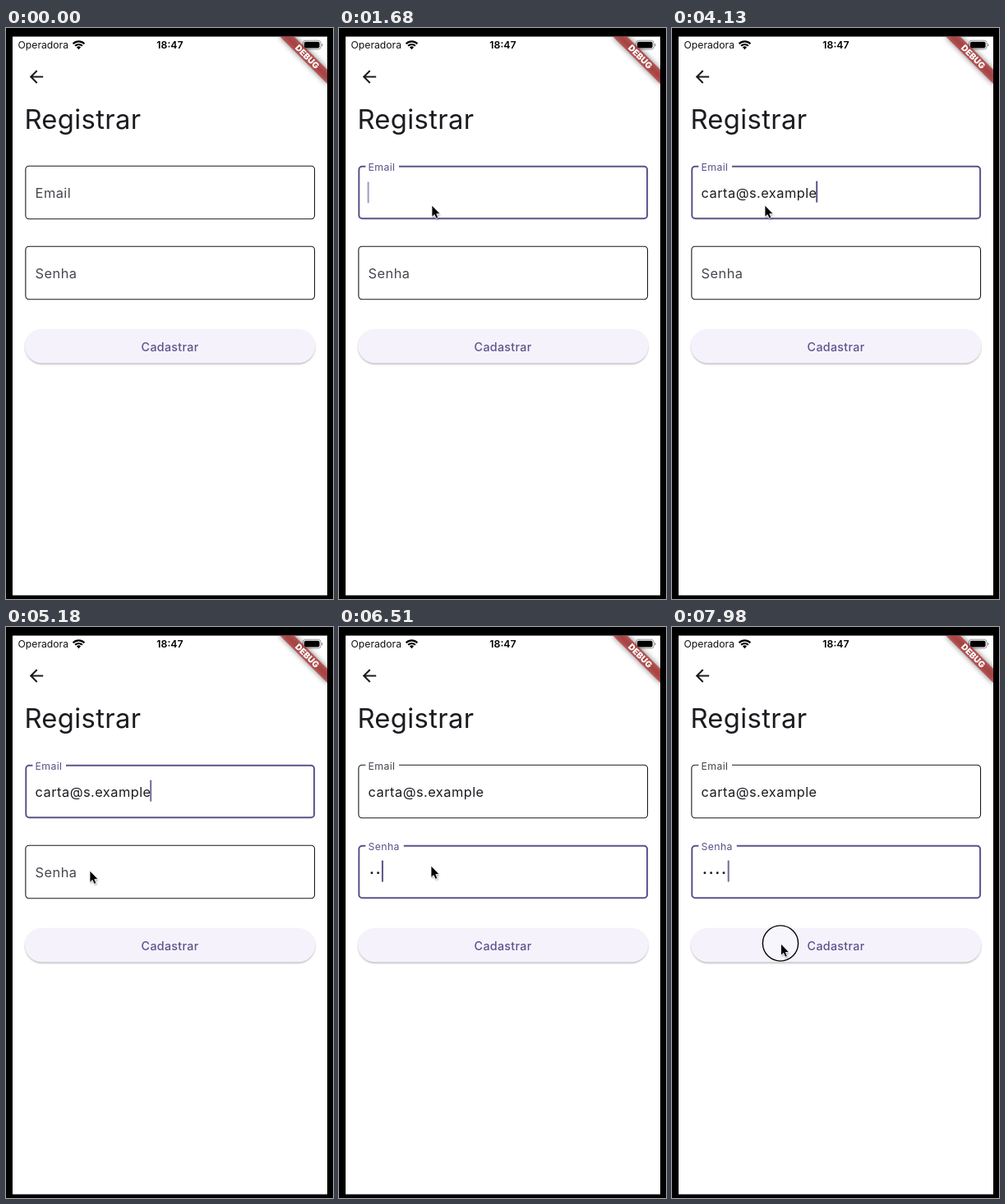
Write an HTML page that moves like this. It is 398x696 px and loops after 8 s.

```html
<!DOCTYPE html>
<html lang="pt">
<head>
<meta charset="utf-8">
<title>Registrar</title>
<style>
  html, body { margin: 0; width: 100%; height: 100%; overflow: hidden; background: #000; }
  svg { display: block; width: 398px; height: 696px; font-family: Inter, Roboto, sans-serif; }
  .body { font-size: 16.4px; letter-spacing: .45px; fill: #1d1b20; }
  .line { fill: none; }
</style>
</head>
<body>
<svg viewBox="0 0 398 696">
  <defs>
    <clipPath id="screen"><rect x="8" y="10.5" width="383" height="681"/></clipPath>
    <filter id="blur" x="-50%" y="-200%" width="200%" height="500%"><feGaussianBlur stdDeviation="3.9"/></filter>
    <filter id="soft" x="-10%" y="-30%" width="120%" height="160%"><feGaussianBlur stdDeviation=".9"/></filter>
    <filter id="drop" x="-60%" y="-40%" width="220%" height="200%"><feGaussianBlur stdDeviation="1.1"/></filter>
  </defs>
  <rect width="398" height="696"/>
  <g clip-path="url(#screen)">
    <rect x="8" y="10" width="383" height="682" fill="#fff"/>

    <text x="14.5" y="25.2" font-size="12.2" fill="#111">Operadora</text>
    <g fill="none" stroke="#000" stroke-width="2.1">
      <path d="M81.6 19.2A9.8 9.8 0 0 1 95.4 19.2"/>
      <path d="M84.1 21.8A6.2 6.2 0 0 1 92.9 21.8"/>
    </g>
    <path d="M86 23.6A3.5 3.5 0 0 1 91 23.6L88.5 26.2Z"/>
    <text x="199.5" y="25.2" font-size="12.3" font-weight="600" text-anchor="middle">18:47</text>
    <rect x="361.5" y="15.2" width="21.6" height="10.8" rx="3.2" fill="none" stroke="#000" stroke-opacity=".4"/>
    <rect x="363" y="16.7" width="18.6" height="7.8" rx="1.9"/>
    <path d="M384.2 18.8A2 2 0 0 1 384.2 22.6Z" opacity=".45"/>

    <path transform="translate(24.7 47.2) scale(1.024)" fill="#1d1b20"
      d="M20 11H7.83l5.59-5.59L12 4l-8 8 8 8 1.41-1.41L7.83 13H20z"/>
    <text x="22.4" y="123" font-size="32.8" letter-spacing=".35" fill="#1d1b20">Registrar</text>

    <g id="fields"></g>

    <rect x="23.3" y="368.6" width="352.8" height="41.2" rx="20.6" fill="#000" opacity=".3" filter="url(#soft)"/>
    <rect x="23" y="367" width="353.4" height="41.6" rx="20.8" fill="#f5f2fc"/>
    <text x="199.6" y="393.6" font-size="14.3" font-weight="500" letter-spacing=".3" text-anchor="middle" fill="#5e548c">Cadastrar</text>

    <g transform="translate(391.2 10.4) scale(1.022) rotate(45)">
      <rect x="-40" y="28" width="80" height="12" fill="#000" opacity=".5" filter="url(#blur)"/>
      <rect x="-40" y="28" width="80" height="12" fill="#b71c1c" opacity=".627"/>
      <text y="37.7" font-size="10.2" font-weight="900" text-anchor="middle" fill="#fff">DEBUG</text>
    </g>

    <circle id="touch" r="21.6" fill="#fff" fill-opacity=".3" stroke="#000" stroke-width="1.4"/>
    <g id="mouse">
      <path d="M1 3V16L4 13.5L6 18L9 17L7 12.5H11Z" opacity=".3" filter="url(#drop)"/>
      <path d="M0 0V14.4L3.2 11.5L5.3 16.3L7.8 15.2L5.8 10.6H10.2Z" stroke="#fff" stroke-width=".8"/>
    </g>
  </g>
</svg>
<script>
const LOOP = 8000;
const PURPLE = [91, 81, 138], INK = [26, 26, 28], GREY = [73, 69, 79];
const EMAIL_TAP = 593, SENHA_TAP = 5408, FLOAT = 167;
const ADDRESS = 'carta@s.example';
const EMAIL_KEYS = [2170, 2240, 2450, 2590, 2590, 2870, 3150, 3220, 3430, 3640, 3640, 3780, 3990, 4060, 4130];
const SENHA_KEYS = [6230, 6510, 6720, 6930];
// time, x, y of the pointer tip
const PATH = [
  [70, 205, 517], [210, 180, 130], [280, 165, 19], [420, 125, 150], [500, 113, 191], [650, 113, 191],
  [910, 113, 216], [4680, 113, 216], [5040, 101, 292], [5180, 102, 297], [5320, 112, 291],
  [7480, 112, 291], [7850, 132.5, 386], [8000, 132.5, 386]
];
const TOUCHES = [[490, 590], [5310, 5400], [7890, 8000]];

const byId = id => document.getElementById(id);
const clamp = v => Math.min(1, Math.max(0, v));
const mix = (a, b, p) => a + (b - a) * p;
const blend = (a, b, p) => `rgb(${a.map((v, i) => Math.round(mix(v, b[i], p)))})`;

function set(el, attrs) {
  for (const k in attrs) el.setAttribute(k, attrs[k]);
}

function add(parent, tag, attrs, text = '') {
  const el = document.createElementNS('http://www.w3.org/2000/svg', tag);
  set(el, attrs);
  el.textContent = text;
  return parent.appendChild(el);
}

// cubic-bezier(.4, 0, .2, 1)
function ease(x) {
  let lo = 0, hi = 1;
  for (let i = 0; i < 20; i++) {
    const s = (lo + hi) / 2, r = 1 - s;
    if (1.2 * r * r * s + .6 * r * s * s + s ** 3 < x) lo = s; else hi = s;
  }
  return 3 * (1 - lo) * lo * lo + lo ** 3;
}

const progress = (t, start) => ease(clamp((t - start) / FLOAT));

function makeField(label, top, gap) {
  const g = add(byId('fields'), 'g', {});
  return {
    top, gap,
    border: add(g, 'path', { class: 'line' }),
    label: add(g, 'text', { class: 'body' }, label),
    value: add(g, 'text', { class: 'body', x: 35.6, y: top + 38.4 }),
    dots: add(g, 'g', { fill: '#1d1b20' }),
    caret: add(g, 'rect', { width: 2, height: 26.2, rx: .8, fill: `rgb(${PURPLE})` })
  };
}

function outline(f, width, gap) {
  const d = (width - 1) / 2, r = 4.2 - d / 2;
  const l = 23.8 + d, t = f.top + d, w = 351.8 - 2 * d, h = 64.6 - 2 * d;
  const arc = (x, y) => `a${r} ${r} 0 0 1 ${x} ${y}`;
  return `M${32.4 + gap} ${t}H${l + w - r}${arc(r, r)}v${h - 2 * r}${arc(-r, r)}` +
    `H${l + r}${arc(-r, -r)}v${2 * r - h}${arc(r, -r)}H32.4`;
}

function drawField(f, lift, focus) {
  const width = mix(1.1, 2, focus);
  set(f.border, {
    d: outline(f, width, f.gap * lift),
    stroke: blend(INK, PURPLE, focus),
    'stroke-width': width
  });
  const y = f.top + mix(38.4, 5.3, lift);
  set(f.label, { transform: `translate(35.6 ${y}) scale(${mix(1, .75, lift)})` });
  f.label.style.fill = blend(GREY, PURPLE, focus);
}

function blink(s) {
  s %= 950;
  if (s < 525) return 1;
  return s < 930 ? 1 - clamp((s - 525) / 120) : clamp((s - 930) / 140);
}

// The first blink fades in only after a full visible phase
function caretAlpha(t, origin) {
  const s = t - origin;
  return s > 930 && s < 1070 ? clamp((s - 930) / 140) : blink(s);
}

function drawCaret(f, x, alpha, empty) {
  set(f.caret, { x, y: f.top + (empty ? 19.2 : 18.3), opacity: alpha });
}

const typed = (keys, t) => keys.filter(k => k <= t).length;

function pointer(t) {
  let i = 0;
  while (i < PATH.length - 2 && PATH[i + 1][0] <= t) i++;
  const [t0, x0, y0] = PATH[i], [t1, x1, y1] = PATH[i + 1];
  const p = clamp((t - t0) / (t1 - t0)), s = p * p * (3 - 2 * p);
  return [mix(x0, x1, s), mix(y0, y1, s)];
}

const email = makeField('Email', 168.2, 40.6);
const senha = makeField('Senha', 266.2, 46.4);
for (let i = 0; i < 4; i++) add(senha.dots, 'circle', { cx: 39.9 + 7.7 * i, cy: 299.8, r: 1.45 });

function draw(t) {
  const first = progress(t, EMAIL_TAP), second = progress(t, SENHA_TAP);
  drawField(email, first, first * (1 - second));
  drawField(senha, second, second);

  const n = typed(EMAIL_KEYS, t);
  email.value.textContent = ADDRESS.slice(0, n);
  const end = n ? 35.6 + email.value.getComputedTextLength() - 1.4 : 34.6;
  const onEmail = t >= EMAIL_TAP && t < SENHA_TAP;
  drawCaret(email, end, onEmail ? caretAlpha(t, n ? EMAIL_KEYS[n - 1] : 670) : 0, !n);

  const m = typed(SENHA_KEYS, t);
  [...senha.dots.children].forEach((dot, i) => set(dot, { opacity: i < m ? 1 : 0 }));
  const origin = m ? SENHA_KEYS[m - 1] : 5400;
  drawCaret(senha, m ? 36.1 + 7.9 * m : 34.6, t >= SENHA_TAP ? caretAlpha(t, origin) : 0, !m);

  const [x, y] = pointer(t);
  set(byId('mouse'), { transform: `translate(${x} ${y})`, opacity: t < 70 ? 0 : 1 });
  const down = TOUCHES.some(([a, b]) => t >= a && t < b);
  set(byId('touch'), { cx: x - .5, cy: y - .5, opacity: down ? 1 : 0 });
}

const begin = performance.now();
function tick() {
  draw((performance.now() - begin) % LOOP);
  requestAnimationFrame(tick);
}
tick();
</script>
</body>
</html>
```
